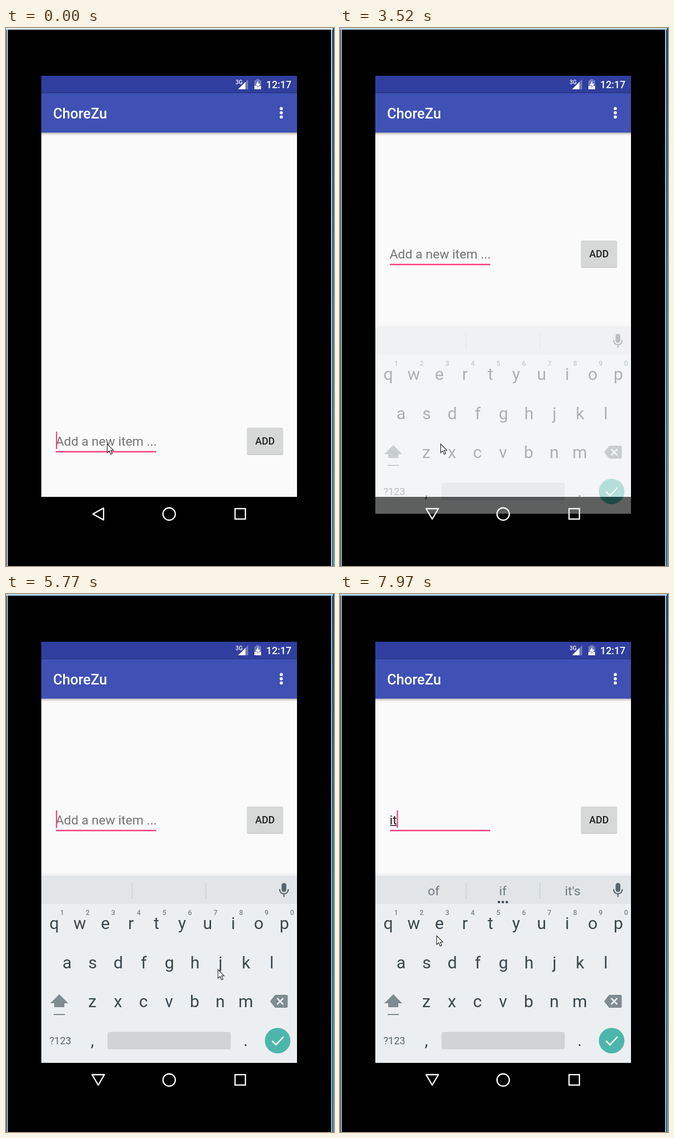
An HTML page that plays this animation: 585 by 957 pixels, repeating every 8 s.

```html
<!DOCTYPE html>
<html lang="en">
<head>
<meta charset="utf-8">
<title>To-do list</title>
<style>
html, body { margin: 0; width: 100%; height: 100%; overflow: hidden; background: #000; }
svg { display: block; width: 585px; height: 957px; font-family: Roboto, sans-serif; }
.mid { text-anchor: middle; }
.bold { font-weight: 500; }
.key { font-size: 30px; fill: #37474f; text-anchor: middle; }
.num { font-size: 12.5px; font-weight: 500; fill: #78868d; text-anchor: middle; }
.tip { font-size: 22.8px; fill: #6f7a80; text-anchor: middle; }
</style>
</head>
<body>
<svg viewBox="0 0 585 957">
  <defs>
    <linearGradient id="shade" x2="0" y2="1">
      <stop stop-color="#000" stop-opacity=".28"/><stop offset="1" stop-color="#000" stop-opacity="0"/>
    </linearGradient>
    <linearGradient id="desk" x2="0" y2="1">
      <stop stop-color="#17568c"/><stop offset=".5" stop-color="#2f9fc0"/><stop offset="1" stop-color="#47b4c6"/>
    </linearGradient>
  </defs>

  <rect width="585" height="957"/>
  <path id="frame" d="M0 0H583V3H0ZM1 3H3V957H1ZM580 3H582V957H580Z"/>
  <rect x="583" width="2" height="957" fill="url(#desk)"/>

  <rect x="63" y="85" width="456" height="749" fill="#fafafa"/>
  <rect x="63" y="85" width="456" height="31" fill="#303f9f"/>
  <rect x="63" y="115" width="456" height="71" fill="#3f51b5"/>
  <rect x="63" y="114.5" width="456" height="1.5" fill="#283583"/>
  <rect x="63" y="186" width="456" height="5" fill="url(#shade)"/>
  <g fill="#fff">
    <text class="bold" x="409.5" y="99.5" font-size="10">3G</text>
    <path d="M432 91V109H414Z" opacity=".3"/>
    <path d="M427 96V109H414Z"/>
    <path d="M446 91H452V93H455V109H443V93H446Z" opacity=".3"/>
    <path d="M443 103H455V109H443ZM450 94L445 102H448.5V107L453.5 99H450Z"/>
    <text class="bold" x="509" y="107" font-size="17.7" text-anchor="end">12:17</text>
    <text class="bold" x="84" y="160.500" font-size="25.3">ChoreZu</text>
    <circle cx="491" cy="143.300" r="2.800"/><circle cx="491" cy="150.800" r="2.800"/><circle cx="491" cy="158.300" r="2.800"/>
  </g>

  <g id="form">
    <text id="hint" x="88.500" y="743" font-size="22.8" fill="#737373">Add a new item ...</text>
    <text id="typed" x="88.500" y="743" font-size="22.8" fill="#212121"></text>
    <rect id="under" x="89" y="744" height="1.500" fill="#212121"/>
    <rect x="89" y="752.500" width="179" height="2.500" fill="#ff4081"/>
    <rect id="caret" y="718" width="2.200" height="31" fill="#ff4081"/>
    <rect x="429.500" y="712" width="65" height="48" rx="3" fill="#000" opacity=".1"/>
    <rect x="430" y="712" width="64" height="47" rx="3" fill="#000" opacity=".15"/>
    <rect x="430" y="711" width="64" height="47" rx="2.500" fill="#d6d7d7"/>
    <text class="mid bold" x="462" y="741" font-size="17.7" fill="#212121">ADD</text>
  </g>

  <g fill="none" stroke="#fff" stroke-width="2.300" stroke-linejoin="round">
    <path id="back"/>
    <circle cx="291" cy="864.500" r="11"/>
    <rect x="408.500" y="855" width="18.500" height="18.500" stroke-linejoin="miter"/>
  </g>

  <g id="board">
    <rect x="63" y="497" width="456" height="4" fill="#000" opacity=".03"/>
    <rect x="63" y="501" width="456" height="333" fill="#eceff1"/>
    <rect x="63" y="501" width="456" height="50" fill="#e1e5e8"/>
    <path d="M225 512V542M356.500 512V542" stroke="#c3c9cc"/>
    <g id="tips">
      <text class="tip" x="167" y="536">of</text>
      <text class="tip" x="290.500" y="536">if</text>
      <text class="tip" x="415" y="536">it's</text>
      <g fill="#37474f"><circle cx="283.500" cy="548" r="2.200"/><circle cx="290.500" cy="548" r="2.200"/><circle cx="297.500" cy="548" r="2.200"/></g>
    </g>
    <rect x="491.500" y="514" width="8.500" height="16" rx="4.200" fill="#57666e"/>
    <path d="M488 525C488 536 503.500 536 503.500 525M495.700 533V539" fill="none" stroke="#57666e" stroke-width="2.200"/>
    <rect id="press" x="382" y="552" width="46" height="66" fill="#d5dadd"/>
    <g id="keys"></g>
    <path d="M95 712L111 728H104V735H86V728H79ZM85 747H105V749H85Z" fill="#7e8b91"/>
    <path d="M471 724.500L480 713H500Q502.500 713 502.500 715.500V733.500Q502.500 736 500 736H480Z" fill="#7e8b91"/>
    <path d="M483.500 719L494.500 730M494.500 719L483.500 730" stroke="#eceff1" stroke-width="2.500"/>
    <text class="mid" x="97" y="801" font-size="18" fill="#57666e">?123</text>
    <rect x="181" y="779" width="220" height="31" rx="4" fill="#d0d4d7"/>
    <circle cx="484.500" cy="794.500" r="22.800" fill="#4db6ac"/>
    <path d="M474.500 795L481.500 802L495 787.500" fill="none" stroke="#fff" stroke-width="2.500"/>
    <g id="popup">
      <rect x="373" y="488" width="64" height="64" rx="3" fill="#fafafa"/>
      <text class="key" x="405" y="530">i</text>
    </g>
  </g>

  <path id="mouse" d="M0 0V15.500L3.700 12.200L6.300 18.300L9 17.200L6.400 11.200H11Z" fill="#fff" stroke="#222" stroke-width="1.100"/>
</svg>
<script>
const $ = id => document.getElementById(id);
const LOOP = 8000, PITCH = 45.6;

// Each track lists [start time, value]; a value holds until the next one.
const pointer = [[0, [180.5, 740]], [2690, [179.5, 740]], [5650, [250, 716]], [5770, [378, 668]],
  [5900, [418, 616]], [6020, [427, 600]], [6160, [420, 600]], [6290, [408, 598]], [6410, [402, 596]],
  [6560, [402.5, 588]], [6950, [335, 583]], [7070, [278.5, 577]], [7210, [279.5, 574]],
  [7370, [274.5, 585]], [7510, [266.5, 587]], [7660, [262.5, 588.5]], [7820, [235, 597]], [7970, [172.5, 608]]];
const words = [[0, ""], [6830, "i"], [7820, "it"]];
const blinks = [0, 160, 580, 1150, 1670, 2130, 2690, 3360, 3670, 4200, 4780, 5380, 5770, 6290, 6830, 7370, 7820];
const caretX = [89, 94, 101.3], underW = [0, 5, 13];

const at = (track, t) => track.filter(k => k[0] <= t).pop()[1];
const show = (id, on) => $(id).style.display = on ? "" : "none";

function addText(cls, x, y, s) {
  const el = document.createElementNS("http://www.w3.org/2000/svg", "text");
  el.setAttribute("class", cls);
  el.setAttribute("x", x);
  el.setAttribute("y", y);
  el.textContent = s;
  $("keys").append(el);
}
const row = (cls, s, x, y) => [...s].forEach((c, i) => addText(cls, x + i * PITCH, y, c));
row("key", "qwertyuiop", 86, 596);
row("num", "1234567890", 100, 571);
row("key", "asdfghjkl", 109, 666);
row("key", "zxcvbnm", 154, 735);
addText("key", 154, 804, ",");
addText("key", 427.5, 804, ".");

function draw(t) {
  const word = at(words, t), n = word.length;
  const sliding = t < 3670;
  $("frame").setAttribute("fill", t < 2380 ? "#d6e8f5" : "#b3d4ee");
  $("back").setAttribute("d", t < 2960 ? "M155 864.500L174 854V875Z" : "M153.500 855H175.500L164.500 873.500Z");
  $("form").setAttribute("transform", `translate(0 ${t < 3360 ? 0 : -333})`);

  show("hint", !n);
  $("typed").textContent = word;
  $("under").setAttribute("width", underW[n]);
  $("caret").setAttribute("x", caretX[n]);
  show("caret", blinks.filter(b => b <= t).length % 2);

  show("board", t >= 3520);
  $("board").setAttribute("transform", `translate(0 ${sliding ? 30 : 0})`);
  $("board").setAttribute("opacity", sliding ? 0.4 : 1);
  const pressed = t >= 6410 && t < 6830;
  show("press", pressed);
  show("popup", pressed);
  show("tips", t >= 7970);

  $("mouse").setAttribute("transform", `translate(${at(pointer, t)})`);
}

const start = performance.now();
function tick() {
  draw((performance.now() - start) % LOOP);
  requestAnimationFrame(tick);
}
tick();
</script>
</body>
</html>
```
